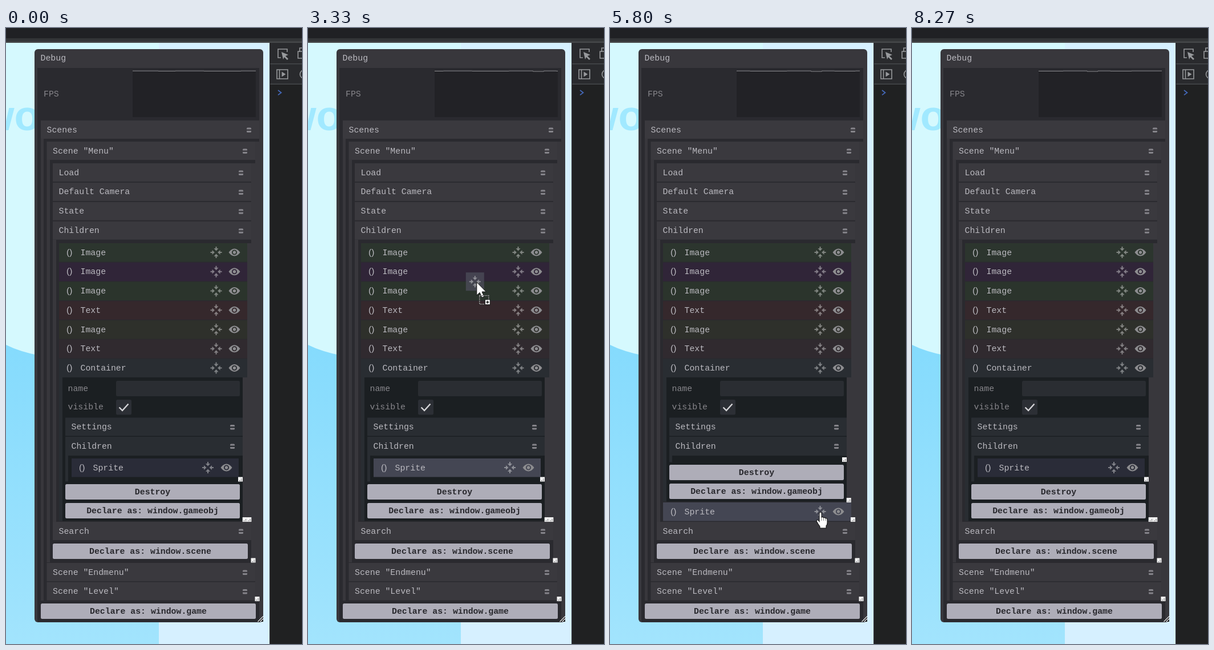
An HTML page that plays this animation: 519 px wide and 1079 px high, repeating every 8390 ms.

```html
<!DOCTYPE html>
<html lang="en">
<head>
<meta charset="utf-8">
<title>Debug panel</title>
<style>
  html, body { margin: 0; width: 100%; height: 100%; overflow: hidden; background: #202124; }
  svg { display: block; width: 100vw; height: 100vh; }
  text { font: 14.85px "Liberation Mono", "Courier New", monospace; fill: #bbbac0; white-space: pre; }
  .label { fill: #87868b; }
  .btn { font-weight: bold; fill: #28282d; text-anchor: middle; }
  .paren { font: 15.5px "Liberation Sans", Arial, sans-serif; }
  .back { font: bold 74px "Liberation Sans", Arial, sans-serif; fill: #a1e9ff; }
</style>
</head>
<body>
<svg id="stage" viewBox="0 0 519 1079" preserveAspectRatio="none"></svg>
<script>
const LOOP = 8390, STEP = 200 / 3;
const DARK = '#2a2a2f', PANEL = '#38373c', ROW = '#3a393e';
const INNER = '#1b1f22', SLATE = '#292d32', SPRITE = [42, 44, 56], LIT = [68, 70, 83];

// ---- drawing helpers ----
const rect = (x, y, r, b, fill, more = '') =>
  `<rect x="${x}" y="${y}" width="${r - x}" height="${b - y}" fill="${fill}" ${more}/>`;
const text = (x, y, s, cls = '') => `<text x="${x}" y="${y}" class="${cls}">${s}</text>`;
const at = (x, y, s, more = '') => `<g transform="translate(${x} ${y})" ${more}>${s}</g>`;
const path = (d, fill, more = '') => `<path d="${d}" fill="${fill}" ${more}/>`;

const fold = (x, y) => at(x, y,
  path('M-4 -1V-2.5Q-4 -4 -2.5 -4H2.5Q4 -4 4 -2.5V-1Z M-4 1.5H4V3Q4 4.5 2.5 4.5H-2.5Q-4 4.5 -4 3Z', '#85848a'));

const arrowIn = '<path d="M-1 -10H1V-7H4L0 -2.6L-4 -7H-1Z"/>';
const moveIcon = (x, y) => at(x, y,
  [0, 90, 180, 270].map(a => `<g transform="rotate(${a})">${arrowIn}</g>`).join(''),
  'fill="#fff" fill-opacity=".4"');

const eye = (x, y) => at(x, y,
  path('M-10 0Q-5.5 -6.5 0 -6.5T10 0Q5.5 6.5 0 6.5T-10 0Z M0 -4.6A4.6 4.6 0 1 0 0 4.6A4.6 4.6 0 1 0 0 -4.6Z',
    '#8d8d90', 'fill-rule="evenodd"') + '<circle r="2.7" fill="#8d8d90"/>');

const grip = (x, y) => rect(x - 4, y - 4, x + 4, y + 4, '#f4f4f4') +
  path('M1 -1h1.5v1.5h-1.5zM-2 1.5h1.5v1.5h-1.5zM1 1.5h1.5v1.5h-1.5z', '#77777c', `transform="translate(${x} ${y})"`);

const folder = (x, r, y, label, fill = ROW, iconX = r - 18, h = 32) =>
  rect(x, y, r, y + h, fill) + text(x + 10.5, y + 20.5, label) + fold(iconX, y + 16.5);

const item = (x, r, y, label, fill, nested, id = '') =>
  rect(x, y, r, y + 32.5, fill, id && `id="${id}"`) +
  text(x + 13, y + 20.5, '()', 'paren') + text(x + 37.5, y + 20.5, label) +
  moveIcon(nested ? 354 : 368.5, y + 16) + eye(nested ? 386.5 : 400.5, y + 16);

const button = (x, r, y, label) =>
  rect(x, y, r, y + 27, '#aeadb8', 'rx="2.5"') + text((x + r) / 2, y + 17.5, label, 'btn');

// ---- page behind the panel and the tools column ----
const backdrop = () =>
  `<defs><linearGradient id="sea" x1="0" y1="0" x2="0" y2="1">
     <stop offset="0" stop-color="#85dbfd"/><stop offset="1" stop-color="#a2e4fd"/></linearGradient>
   <clipPath id="page"><rect y="26" width="462" height="1053"/></clipPath></defs>` +
  rect(0, 0, 519, 1079, '#202124') +
  rect(0, 18, 519, 26, '#333537') + rect(0, 23.5, 519, 26, '#46484a') +
  `<g clip-path="url(#page)">` + rect(0, 26, 268, 1079, '#d5f9fe') +
  path('M0 555Q24 567 60 574H268V1079H0Z', 'url(#sea)') +
  rect(268, 26, 462, 1079, '#d6f0ff') + text(-43, 179, 'wo', 'back') + '</g>';

const tools = () =>
  rect(462, 26, 519, 1079, '#202122') + rect(462, 26, 463.5, 1079, '#303134') +
  rect(463, 26, 519, 98, '#292a2d') + rect(463, 62, 519, 63.5, '#47494c') + rect(463, 97.5, 519, 99, '#47494c') +
  `<g fill="none" stroke="#97999c" stroke-width="1.6">
     <path d="M482 52H477V37H493V42"/><path d="M519 35H515V42M519 41H512V53H519"/>
     <path d="M475 73H494V89H475ZM479.5 73V89"/><circle cx="523" cy="81" r="7.5"/></g>` +
  path('M483 42L495 47L490 49L495 54L493 56L488 51L486 55Z', '#97999c') +
  path('M483.5 76.500L490.500 81L483.5 85.500Z', '#97999c') +
  path('M477 109L482.500 113.2L477 117.4', 'none', 'stroke="#4468b8" stroke-width="1.8"');

// ---- panel ----
const kinds = [
  ['Image', '#2c352e'], ['Image', '#302538'], ['Image', '#2b342c'], ['Text', '#35282c'],
  ['Image', '#2e302b'], ['Text', '#302a2f'], ['Container', SLATE]
];

const panel = () =>
  rect(50, 37, 451, 1041, PANEL, 'rx="6"') + text(60.5, 57, 'Debug') +
  rect(55, 70, 444, 1040, DARK) + text(66, 119.5, 'FPS', 'label') +
  rect(222, 75, 438, 156, '#222226') +
  '<clipPath id="plot"><rect x="222" y="74" width="216" height="4"/></clipPath>' +
  '<path id="graph" fill="none" stroke="#8f8f93" clip-path="url(#plot)"/>' +
  folder(61, 444, 162, 'Scenes') +
  rect(61, 193, 66, 1003, PANEL) + rect(437, 199, 444, 1003, PANEL) +
  folder(71.5, 437, 199, 'Scene "Menu"') +
  rect(71.5, 230, 77, 936, PANEL) + rect(430, 237, 437, 936, PANEL) +
  ['Load', 'Default Camera', 'State', 'Children'].map((s, i) => folder(82, 430, 237 + 33.9 * i, s)).join('') +
  rect(82, 338.7, 430, 371, '#fff', 'id="head" opacity="0"') +
  rect(82, 371, 88, 865, PANEL) + rect(423, 377, 430, 865, PANEL) +
  kinds.map(([s, c], i) => item(93, 423, 377 + 33.75 * i, s, c)).join('') +
  text(109, 635.5, 'name', 'label');

const container = bottom =>
  rect(93, 611, 99, bottom, SLATE) + rect(99, 612, 415, bottom, INNER) + rect(415, 612, 423, bottom, PANEL) +
  text(108.5, 635.5, 'name', 'label') + rect(193, 618, 410, 645, '#2a2d32', 'rx="2.5"') +
  text(108.5, 668, 'visible', 'label') + rect(193, 651, 220, 677.5, '#2c2f35', 'rx="2.5"') +
  path('M198.500 664.500L204 670L214.500 658.500', 'none', 'stroke="#d5d5d8" stroke-width="2.4"') +
  folder(104, 415, 682.5, 'Settings', SLATE) + folder(104, 415, 716, 'Children', SLATE, 397, 33) +
  rect(104, 749, 109, bottom - 69, SLATE);

const ends = y => button(104, 410, y, 'Destroy') + button(104, 410, y + 33, 'Declare as: window.gameobj');

const nestedView = () => '<g id="nested">' + container(863.5) +
  item(115, 408, 754, 'Sprite', SLATE, true, 'rowA') + ends(799) +
  grip(411, 790.5) + grip(418.700, 861) + grip(426.3, 861) + '</g>';

const flatView = () => '<g id="flat">' + container(829.5) + ends(765) +
  item(93, 423, 831, 'Sprite', SLATE, false, 'rowB') +
  grip(411, 756) + grip(418.7, 827) + grip(426, 861) + '</g>';

const footer = () =>
  folder(82, 430, 865, 'Search') + button(82, 424, 903, 'Declare as: window.scene') + grip(433.5, 932.5) +
  folder(71.5, 437, 937, 'Scene "Endmenu"') + folder(71.5, 437, 970.5, 'Scene "Level"') + grip(440.5, 1000) +
  button(61, 438, 1008, 'Declare as: window.game') +
  path('M441 1040L451 1030V1040Z', '#1c1c1f') +
  path('M441.500 1040L451 1030.500M445.500 1040L451 1034.500', 'none', 'stroke="#e8e8e8" stroke-width="1.3"');

// ---- pointers, tip at 0,0 ----
const pointers = () => '<g id="pointer">' +
  '<g id="ghost">' + rect(-19, -17, 13, 15, '#4a4c58', 'opacity=".8"') + moveIcon(-3, -1) + '</g>' +
  path('M0 0V23L5.300 18.200L9 27L13 25.300L9.300 16.800H16.500Z', '#fff', 'id="arrow" stroke="#111" stroke-width="1"') +
  '<g id="plus"><path d="M5 23.500H21V38.500H5Z" fill="none" stroke="#111" stroke-width="1.3"/>' +
  '<path d="M5 23.500H21V38.500H5Z" fill="none" stroke="#eee" stroke-width="1.3" stroke-dasharray="1.5 1.5"/>' +
  rect(14.5, 30.5, 23.5, 39.5, '#fff', 'stroke="#111"') + path('M16.500 35H21.500M19 32.500V37.500', 'none', 'stroke="#111" stroke-width="1.4"') + '</g>' +
  path('M-2 1.500Q0 -1.500 2 1.500V9Q4 7.500 5.500 10Q7.500 8.500 9 11Q11.500 10 12 13V19Q12 22 10 24V28H-1V25Q-5 20 -7 15.500Q-6.500 12.500 -3.500 14.500L-2 16.500Z',
    '#fff', 'id="hand" stroke="#111" stroke-width="1.1"') +
  path('M2 9V15M5.500 10V15M9 11.500V15', 'none', 'id="fingers" stroke="#555" stroke-width=".8"') + '</g>';

const stage = document.getElementById('stage');
stage.innerHTML = backdrop() + tools() + panel() + nestedView() + flatView() + footer() + pointers();
const el = {};
stage.querySelectorAll('[id]').forEach(n => el[n.id] = n);

// ---- motion: time, x, y, ease (k > 0: p^k, k < 0: eased out) ----
const route = [
  [0, 545, 1095, 1], [270, 505, 1058, -2], [410, 505, 1058, 1], [1000, 462, 880, 1.5],
  [1270, 412, 781, 1], [1470, 356, 774, -2], [2500, 356, 774, 1], [2730, 349, 751, -2],
  [2810, 349, 751, 1], [3330, 296, 447, 1.3], [3670, 288, 353, -2], [4405, 288, 353, 1],
  [4850, 335, 640, 1.5], [5270, 367, 837, -1.5], [5470, 369, 848, -2], [5890, 369, 848, 1],
  [6130, 360, 765, 1.4], [6330, 354, 735, -1.5], [6470, 349, 731, -2], [7005, 349, 731, 1],
  [7670, 46, 1084, 1.1]
];
const clamp = v => Math.max(0, Math.min(1, v));

function tipAt(t) {
  const i = route.findIndex(k => k[0] >= t);
  if (i < 0) return [46, 1090];
  if (i === 0) return route[0].slice(1, 3);
  const a = route[i - 1], b = route[i], k = b[3];
  const p = (t - a[0]) / (b[0] - a[0]);
  const e = k > 0 ? p ** k : 1 - (1 - p) ** -k;
  return [a[1] + (b[1] - a[1]) * e, a[2] + (b[2] - a[2]) * e];
}

const tint = p => `rgb(${SPRITE.map((c, i) => Math.round(c + (LIT[i] - c) * p))})`;
const show = (node, on) => node.setAttribute('visibility', on ? 'visible' : 'hidden');

// The frame-rate line scrolls left 3.5 px every 200 ms.
const dips = [[232, 262], [312, 377], [419, 438], [460, 497]];
function graphAt(t) {
  const shift = 3.5 * (9 - Math.floor((t - 66) / 200));
  return 'M222 75.2' + dips.map(([a, b], i) => {
    const y = i === 2 ? 76 : 75.5;
    return `H${a + shift}V${y}H${b + shift}V75.2`;
  }).join('').replace(/H-?[\d.]+/g, h => 'H' + Math.max(222, +h.slice(1))) + 'H600';
}

function draw(now) {
  const t = Math.floor((now % LOOP + 4) / STEP) * STEP;
  const [x, y] = tipAt(t);
  const flat = t >= 3725 && t < 6860;
  const drag = (t > 2550 && t < 3725) || (t > 5950 && t < 6860);
  const hand = !drag && x > 50 && x < 444 && y > 160 && y < 1040;

  show(el.nested, !flat);
  show(el.flat, flat);
  el.rowA.setAttribute('fill', tint(t < 3725 ? clamp((t - 1795) / 200) : 0));
  el.rowB.setAttribute('fill', tint(clamp((t - 5265) / 200)));
  el.head.setAttribute('opacity', .035 * clamp((t - 3725) / 200) * clamp((4600 - t) / 150));
  el.graph.setAttribute('d', graphAt(t));

  el.pointer.setAttribute('transform', `translate(${x.toFixed(1)} ${y.toFixed(1)})`);
  show(el.ghost, drag);
  show(el.plus, drag);
  show(el.arrow, !hand);
  show(el.hand, hand);
  show(el.fingers, hand);
}

const start = performance.now();
function tick() {
  draw(performance.now() - start);
  requestAnimationFrame(tick);
}
tick();
</script>
</body>
</html>
```
